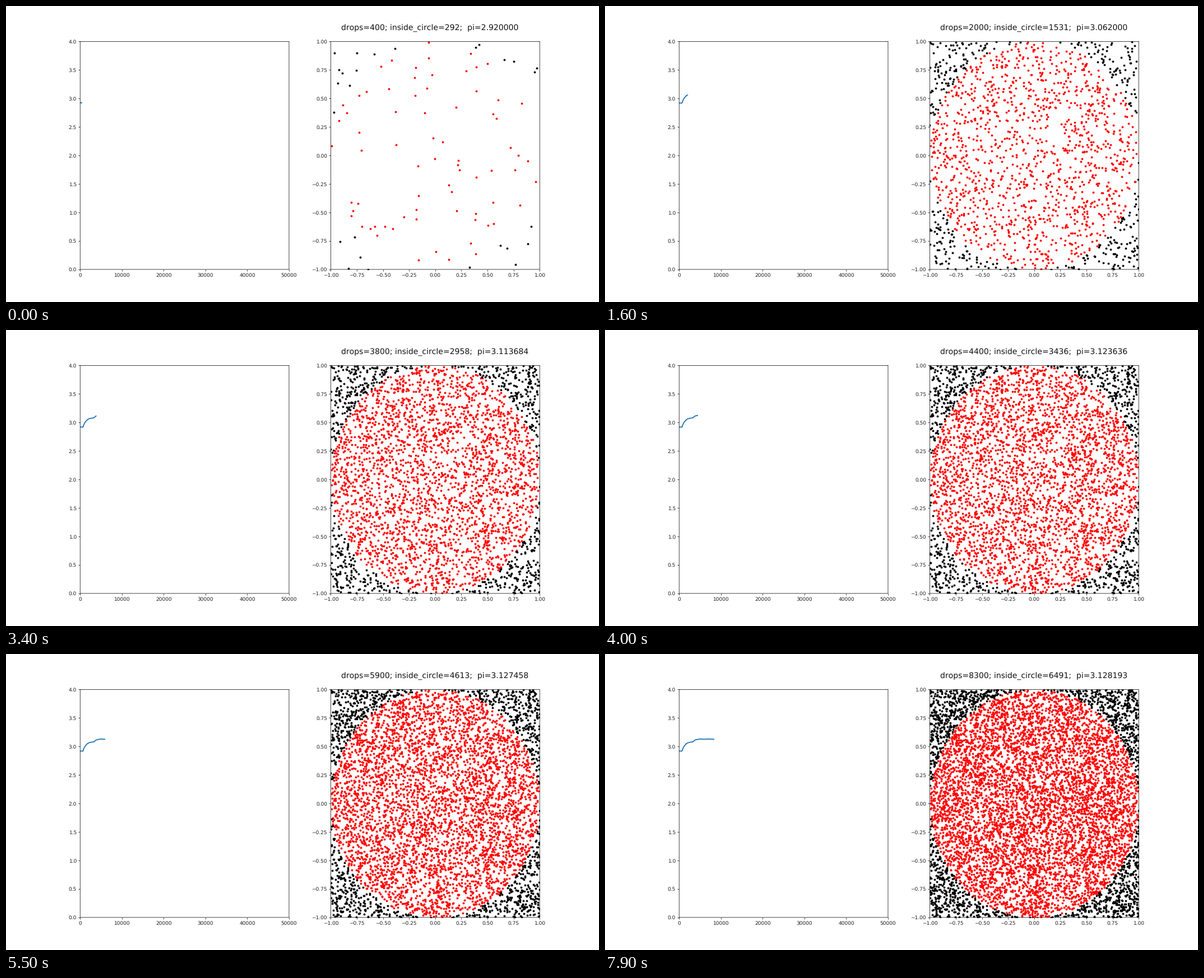
A matplotlib script that plays this animation: 1058x529 px, repeating every 8000 ms.

```python
import numpy as np
import matplotlib.pyplot as plt
from matplotlib.animation import FuncAnimation

plt.rcParams.update({"text.hinting": "none", "text.hinting_factor": 1})

FRAMES, STEP, START = 80, 100, 3
rng = np.random.default_rng(12)

# Key points of the running count: total drops -> drops inside the circle
HITS = {0: 0, 400: 292, 700: 511, 1200: 901, 2000: 1531, 3300: 2543,
        3800: 2958, 5000: 3914, 5900: 4613, 7100: 5557, 8300: 6491}
drops = STEP * np.arange(1, START + FRAMES + 1)
inside = np.rint(np.interp(drops, list(HITS), list(HITS.values()))).astype(int)
pi_est = 4 * inside / drops


def throw(n, hit):
    """n random drops, all inside the unit circle or all outside it."""
    pts = rng.uniform(-1, 1, (12 * n, 2))
    return pts[(np.hypot(*pts.T) < 1) == hit][:n]


# The first three batches are counted but not plotted
n_red = inside[START:] - inside[START - 1]
n_black = STEP * np.arange(1, FRAMES + 1) - n_red
reds, blacks = throw(n_red[-1], True), throw(n_black[-1], False)

fig, (left, right) = plt.subplots(1, 2, figsize=(16, 8), dpi=66.125)
fig.subplots_adjust(left=0.125, right=0.9, bottom=0.11, top=0.88, wspace=0.2)
left.set(xlim=(0, 50000), ylim=(0, 4))
right.set(xlim=(-1, 1), ylim=(-1, 1))
for ax in (left, right):
    ax.tick_params(labelcolor="#222222")
    for spine in ax.spines.values():
        spine.set_snap(False)

curve, = left.plot([], [], color="C0", lw=2)
red, = right.plot([], [], "r.", ms=6.3)
black, = right.plot([], [], "k.", ms=6.3)
label = right.text(-0.9, 1.1, "", fontsize=15, color="#111111")


def draw(i):
    now = i + START
    curve.set_data(drops[:now + 1], pi_est[:now + 1])
    red.set_data(*reds[:n_red[i]].T)
    black.set_data(*blacks[:n_black[i]].T)
    label.set_text(f"drops={drops[now]}; inside_circle={inside[now]};  "
                   f"pi={pi_est[now]:.6f}")
    return curve, red, black, label


anim = FuncAnimation(fig, draw, frames=FRAMES, interval=100,
                     init_func=lambda: draw(0), repeat=True, repeat_delay=0)
plt.show()
```
